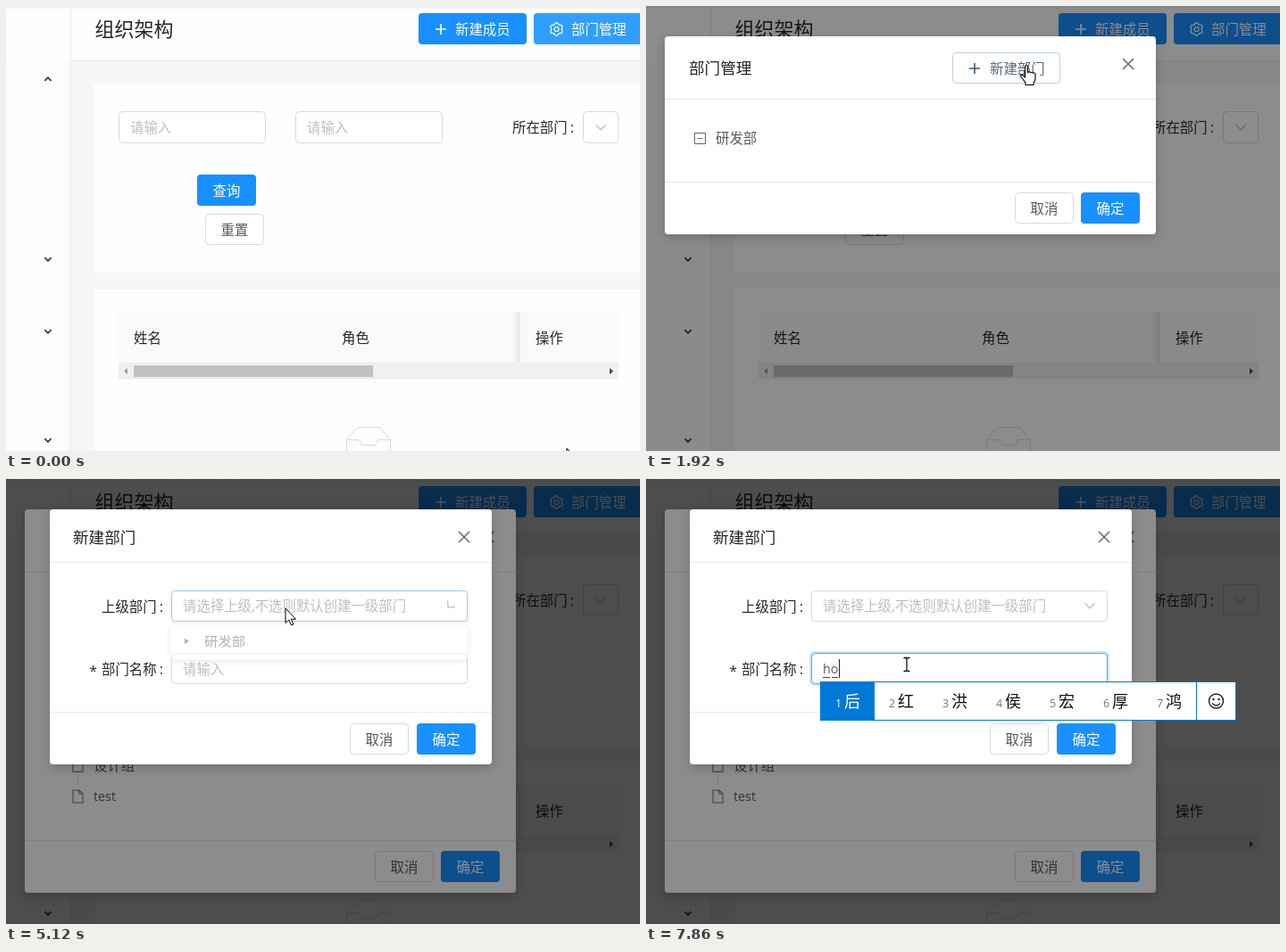
Write an HTML page that moves like this. It is 710 px wide and 499 px high and loops after 8000 ms.

```html
<!DOCTYPE html>
<html lang="zh-CN">
<head>
<meta charset="utf-8">
<style>
html, body { margin: 0; width: 100%; height: 100%; overflow: hidden; background: #f5f6f8; }
svg { display: block; width: 710px; height: 499px; }
text { font-family: "Open Sans", "Noto Sans CJK SC", "Noto Sans CJK", sans-serif; white-space: pre; }
.title { font-weight: 300; }
.modal { filter: drop-shadow(0 4px 6px rgba(0,0,0,.18)); }
.pop { filter: drop-shadow(0 2px 4px rgba(0,0,0,.2)); }
</style>
</head>
<body>
<svg id="stage" viewBox="0 0 710 499" xmlns="http://www.w3.org/2000/svg"></svg>
<script>
const LOOP = 8000;
const BLUE = '#1890ff', SKY = '#40a9ff', LINE = '#d9d9d9', RULE = '#e8e8e8';
const INK = '#262626', BODY = '#595959', HINT = '#bfbfbf';

// ---- drawing helpers ----
const rect = (x, y, w, h, fill, more = '') =>
  `<rect x="${x}" y="${y}" width="${w}" height="${h}" fill="${fill}" ${more}/>`;
const frame = (x, y, w, h, stroke = LINE, fill = '#fff', more = '') =>
  rect(x + .5, y + .5, w - 1, h - 1, fill, `rx="4" stroke="${stroke}" ${more}`);
const text = (x, cy, s, fill = INK, size = 15.4, more = '') =>
  `<text x="${x}" y="${cy + size * .37}" font-size="${size}" fill="${fill}" ${more}>${s}</text>`;
const title = (x, cy, s, size = 17.6) => text(x, cy, s, INK, size, 'class="title"');
const latin = (x, cy, s, fill, size = 14.3) => text(x, cy, s, fill, size);
const path = (d, stroke, width = 1, more = '') =>
  `<path d="${d}" fill="none" stroke="${stroke}" stroke-width="${width}" ${more}/>`;
const plus = (x, y, c, more = '') => path(`M${x - 6} ${y}h12M${x} ${y - 6}v12`, c, 1.6, more);
const cross = (x, y) => path(`M${x - 6} ${y - 6}l12 12m0 -12l-12 12`, '#666', 1.5);
const chevron = (x, y, c = '#333', w = 1.6, r = 4, more = '') =>
  path(`M${x - r} ${y - r / 2}l${r} ${r}l${r} ${-r}`, c, w, more);
const mid = 'text-anchor="middle"';
const ghost = (x, y, s) => frame(x, y, 66, 35) + text(x + 33, y + 18, s, BODY, 15.4, mid);
const solid = (x, y, s) => rect(x, y, 66, 35, BLUE, 'rx="4"') +
  text(x + 33, y + 18, s, '#fff', 15.4, mid + ' font-weight="500"');
const label = (x, y, s) => text(x, y, s) + text(x + 65, y, ':');
const field = (x, y, w) => frame(x, y, w, 36) + text(x + 13, y + 18, '请输入', HINT);

function gear(x, y) {
  let d = '';
  for (let i = 0; i < 48; i++) {
    const a = i * Math.PI / 24, r = 6.5 + .8 * Math.cos(6 * a);
    d += `${i ? 'L' : 'M'}${(x + r * Math.sin(a)).toFixed(2)} ${(y - r * Math.cos(a)).toFixed(2)}`;
  }
  return path(d + 'Z', '#fff', 1.3) + `<circle cx="${x}" cy="${y}" r="2.5" fill="none" stroke="#fff" stroke-width="1.2"/>`;
}

// ---- scene parts ----
const page = () =>
  rect(0, 0, 710, 499, '#f5f6f8') +
  rect(0, 0, 710, 61, '#fefefe') + rect(0, 0, 710, 4, 'url(#top)') + rect(73, 61, 637, 1, RULE) +
  rect(0, 61, 72, 438, '#fcfcfc') + rect(72, 0, 1, 499, '#f0e6e8') +
  chevron(47, 82, '#333', 1.7, 3.6, 'transform="rotate(180 47 82)"') +
  [284, 365, 487].map(y => chevron(47, y, '#333', 1.7, 3.6)).join('') +
  title(99.5, 25.5, '组织架构', 22) +
  rect(462, 8, 121, 35, BLUE, 'rx="4"') + plus(487, 26, '#fff') + text(503, 26.5, '新建成员', '#fff') +
  rect(591, 8, 121, 35, BLUE, 'rx="4" id="manage"') + gear(616.5, 26) + text(633, 26.5, '部门管理', '#fff') +
  rect(99, 88, 611, 211, '#fefefe') + rect(99, 317, 611, 182, '#fefefe') +
  field(126, 118, 165) + field(324, 118, 165) +
  label(567, 136, '所在部门') + frame(646, 118, 40, 36) + chevron(666, 136, HINT, 1.3, 5.5) +
  solid(214, 189, '查询') + ghost(223, 233, '重置') +
  rect(126, 343, 560, 57, '#fafafa') + rect(566, 343, 10, 57, 'url(#side)') +
  text(143, 372, '姓名') + text(376, 372, '角色') + text(593, 372, '操作') +
  rect(126, 400, 560, 18, '#f0f0f0') + rect(126, 400, 560, 1, RULE) + rect(126, 417, 560, 1, RULE) +
  rect(143, 403, 268, 13, '#c1c1c1') +
  '<path d="M136 406v7l-4 -3.5z" fill="#999"/><path d="M676 406v7l4 -3.5z" fill="#444"/>' +
  path('M381.5 500V486.500L393.500 472.500H418.500L430.500 486.500V500M381.500 486.500H394q3 0 3 3q0 3 3 3H412q3 0 3 -3q0 -3 3 -3H430.500', LINE);

const fileIcon = y => path(`M75 ${y - 7}h7l4 4v10h-11zM82 ${y - 7}v4h4`, '#777', 1.1);
const teams = ['前端组', '后端组', '测试组', '产品组', '设计组', 'test'];
const rows = () => teams.map((s, i) => {
  const y = 148 + 34.67 * (i + 1);
  return fileIcon(y) + (s === 'test' ? latin(98, y, s, BODY) : text(98, y, s, BODY)) +
    (i ? path(`M80.500 ${y - 22}v9`, LINE) : '');
}).join('');

const listModal = () =>
  rect(21, 34, 550, 183, '#fff', 'rx="4" id="sheet" class="modal"') +
  title(48, 69, '部门管理') + rect(21, 104, 550, 1, RULE) +
  frame(343, 52, 121, 35, LINE, '#fff', 'id="addBox"') + plus(368, 70, '#444', 'id="addPlus"') +
  text(385, 70, '新建部门', BODY, 15.4, 'id="addText"') + cross(540, 65) +
  `<g id="root">${path('M54.500 142.500h12v12h-12zM57.500 148.500h6', '#666')}${text(78, 148, '研发部', BODY)}</g>` +
  `<g clip-path="url(#grow)">${rows()}</g>` +
  `<g id="foot">${rect(21, 158, 550, 1, RULE)}${ghost(413, 170, '取消')}${solid(487, 170, '确定')}</g>`;

const formModal = () =>
  rect(49, 34, 495, 286, '#fff', 'rx="4" class="modal"') +
  title(75, 65, '新建部门') + cross(513, 65) + rect(49, 93, 495, 1, RULE) +
  label(107, 143, '上级部门') + rect(183, 123, 336, 39, BLUE, 'rx="5" id="pickRing"') +
  frame(185, 125, 332, 35, LINE, '#fff', 'id="pickBox"') +
  text(198, 142.5, '请选择上级,不选则默认创建一级部门', HINT) +
  `<g id="pickArrow">${chevron(497, 142, HINT, 1.3, 5.5)}</g>` +
  text(93.5, 215, '*', INK) + label(107, 213, '部门名称') +
  rect(183, 193, 336, 39, BLUE, 'rx="5" id="nameRing"') +
  frame(185, 195, 332, 35, LINE, '#fff', 'id="nameBox"') +
  text(198, 213, '请输入', HINT, 15.4, 'id="hint"') + text(198, 213, '', BODY, 14.3, 'id="typed"') +
  path('', '#444', 1, 'id="under"') + rect(198, 202, 1, 21, '#222', 'id="caret"') +
  rect(49, 261, 495, 1, RULE) + ghost(385, 274, '取消') + solid(460, 274, '确定') +
  `<g id="drop">${rect(185, 164, 332, 43.6, '#fff', 'rx="4" class="pop"')}` +
  `<path d="M200 180.500v7l5 -3.500z" fill="#555"/>${text(222, 184, '研发部', BODY)}</g>`;

const past = ['test', 'hl-manager-frontend', 'hl-social-frontend', 'hl-group-frontend',
  'hl-manager-frontend-prod', 'hl-social-frontend-prod'];
const history = () =>
  rect(184, 232, 334, 232, '#fff', 'rx="2" class="pop"') + rect(184, 239, 334, 36, '#efefef', 'id="hover"') +
  past.map((s, i) => latin(196.3, 257 + 36 * i, s, '#111', 13.65)).join('');

const ime = () =>
  rect(195.5, 227.5, 465, 43, '#fff', 'stroke="#0078d7"') + rect(195, 227, 61, 44, '#0078d7') +
  [0, 1, 2, 3, 4, 5, 6].map(i =>
    latin(212 + 60 * i, 251, i + 1, i ? '#777' : '#fff', 12.5) +
    text(222 + 60 * i, 249.5, '', i ? '#111' : '#fff', 18, 'class="word"')).join('') +
  rect(616, 227, 1, 44, '#0078d7') +
  '<circle cx="638.500" cy="249" r="8" fill="none" stroke="#222" stroke-width="1.4"/>' +
  '<circle cx="635.500" cy="247" r="1.200" fill="#222"/><circle cx="641.500" cy="247" r="1.200" fill="#222"/>' +
  path('M634 251.500q4.500 5 9 0', '#222', 1.3);

const cursors =
  '<g id="cursor">' +
  '<path id="arrow" d="M0 0V16.500L3.800 13L6.500 19L9 18L6.300 12.200H11.500Z" fill="#fff" stroke="#000"/>' +
  '<path id="hand" d="M-1.500 1.500q1.500 -2 3 0V8.500q1.800 -1.500 3 .3q2 -1.300 3 .5q2 -1 2.500 1.200V15q0 3 -2 5v2.500H-1V20L-6 13.500q-1 -2.300 1 -2.500l3.500 2.800Z" fill="#fff" stroke="#000" stroke-width="1.100"/>' +
  '<path id="beam" d="M-3.500 -7.500h2.500l1 1l1 -1h2.500M0 -6.500V6.500M-3.500 7.500h2.500l1 -1l1 1h2.500" fill="none" stroke="#111" stroke-width="1.300"/></g>';

const stage = document.getElementById('stage');
stage.innerHTML =
  '<defs><linearGradient id="top" x2="0" y2="1"><stop stop-color="#ececec"/><stop offset="1" stop-color="#fefefe"/></linearGradient>' +
  '<linearGradient id="side"><stop stop-color="#000" stop-opacity="0"/><stop offset="1" stop-color="#000" stop-opacity=".08"/></linearGradient>' +
  '<clipPath id="grow"><rect id="growBox" x="21" y="165" width="550" height="0"/></clipPath></defs>' +
  page() + rect(0, 0, 710, 499, '#000', 'id="mask1"') + `<g id="list">${listModal()}</g>` +
  rect(0, 0, 710, 499, '#000', 'id="mask2"') + `<g id="form">${formModal()}</g>` +
  `<g id="history">${history()}</g><g id="ime">${ime()}</g>` + cursors;

// ---- motion ----
const el = {};
stage.querySelectorAll('[id]').forEach(n => el[n.id] = n);
const words = stage.querySelectorAll('.word');
const set = (id, attrs) => { for (const k in attrs) el[id].setAttribute(k, attrs[k]); };
const show = (id, on) => el[id].style.display = on ? '' : 'none';
const prog = (t, start, span) => Math.min(1, Math.max(0, (t - start) / span));
const pulse = (t, on, off, span = 300) => prog(t, on, span) * (1 - prog(t, off, span));
const smooth = p => p * p * (3 - 2 * p);
const mix = (a, b, k) => {
  const ch = (s, i) => parseInt(s.slice(i, i + 2), 16);
  return `rgb(${[1, 3, 5].map(i => Math.round(ch(a, i) + (ch(b, i) - ch(a, i)) * k))})`;
};

const trail = [
  [70, 628, 496], [600, 646, 26], [1450, 646, 26], [1880, 426, 66], [2250, 426, 66], [2320, 420, 66],
  [2800, 420, 66], [2940, 402, 71], [4300, 402, 71], [4740, 318, 143], [4850, 318, 143], [5000, 313, 145],
  [5280, 313, 145], [5540, 292, 209], [5720, 292, 209], [6130, 299, 292], [6250, 299, 292], [6570, 292, 209],
  [6800, 292, 209], [6850, 292, 208]
];
function pointer(t) {
  const i = trail.findIndex(k => k[0] > t);
  if (i === 0) return trail[0].slice(1);
  if (i < 0) return trail[trail.length - 1].slice(1);
  const [a, b] = [trail[i - 1], trail[i]], p = smooth((t - a[0]) / (b[0] - a[0]));
  return [a[1] + (b[1] - a[1]) * p, a[2] + (b[2] - a[2]) * p];
}

// zoom a dialog out of the clicked point while its mask fades in
function openModal(id, mask, t, start, x, y) {
  const e = 1 - Math.pow(1 - prog(t, start, 300), 4.2), s = .2 + .8 * e;
  show(id, t >= start);
  set(id, { opacity: e, transform: e < 1 ? `translate(${x} ${y}) scale(${s}) translate(${-x} ${-y})` : '' });
  set(mask, { opacity: .45 * prog(t, start, 200) });
}

function draw(t) {
  const [x, y] = pointer(t);
  openModal('list', 'mask1', t, 640, 646, 26);
  openModal('form', 'mask2', t, 3400, 402, 71);

  const warm = Math.max(.57 * (1 - prog(t, 40, 160)), pulse(t, 520, 640, 180));
  set('manage', { fill: mix(BLUE, SKY, warm) });

  const loaded = t >= 1870, grown = 208 * smooth(prog(t, 1925, 150));
  const extra = loaded ? 39 + grown : 0;
  show('root', loaded);
  set('growBox', { height: grown });
  set('sheet', { height: 183 + extra });
  set('foot', { transform: `translate(0 ${extra})` });

  const lit = pulse(t, 1860, 3420);
  set('addBox', { stroke: mix(LINE, SKY, lit) });
  set('addText', { fill: mix(BODY, SKY, lit) });
  set('addPlus', { stroke: mix('#444444', SKY, lit) });

  const pick = pulse(t, 5030, 5560);
  set('pickBox', { stroke: mix(LINE, SKY, pick) });
  set('pickRing', { opacity: .2 * pick });
  set('pickArrow', { transform: `rotate(${180 * smooth(pick)} 497 142)` });
  const drop = pulse(t, 5030, 5560, 200);
  show('drop', drop > 0);
  set('drop', { opacity: drop, transform: `translate(0 164) scale(1 ${.8 + .2 * drop}) translate(0 -164)` });

  const focus = prog(t, 5560, 250), open = t >= 5620 && t < 7770;
  const row = open && y >= 239 ? Math.floor((y - 239) / 36) : -1;
  const keys = t >= 7860 ? 'ho' : t >= 7770 ? 'h' : '';
  show('history', open);
  show('hover', row >= 0);
  set('hover', { y: 239 + 36 * Math.max(row, 0) });
  set('nameBox', { stroke: mix(LINE, SKY, focus), fill: row >= 0 ? '#e8f0fe' : '#fff' });
  set('nameRing', { opacity: .22 * focus });
  el.typed.textContent = row >= 0 ? past[row] : keys;
  show('hint', row < 0 && !keys);
  set('under', { d: keys ? 'M198 222.500h8' + (keys[1] ? 'm2 0h7' : '') : '' });
  const blink = t >= 5560 && t < 6030 || t >= 7080 && t < 7540;
  show('caret', keys || blink && row < 0);
  set('caret', { x: 198 + (keys[1] ? 18 : keys ? 9 : 0) });

  show('ime', keys);
  const list = keys[1] ? '后红洪侯宏厚鸿' : '和会好还很后话';
  words.forEach((w, i) => w.textContent = list[i]);

  const overAdd = t > 1700 && t < 3420 && x > 343 && x < 464 && y > 52 && y < 87;
  const overManage = t < 640 && x > 591 && y < 43;
  const hand = overAdd || overManage, beam = t > 5200 && y > 195 && y < 231;
  show('hand', hand);
  show('beam', beam);
  show('arrow', !hand && !beam);
  set('cursor', { transform: `translate(${Math.round(x)} ${Math.round(y)})` });
}

const born = performance.now();
function tick() {
  draw((performance.now() - born) % LOOP);
  requestAnimationFrame(tick);
}
tick();
</script>
</body>
</html>
```
